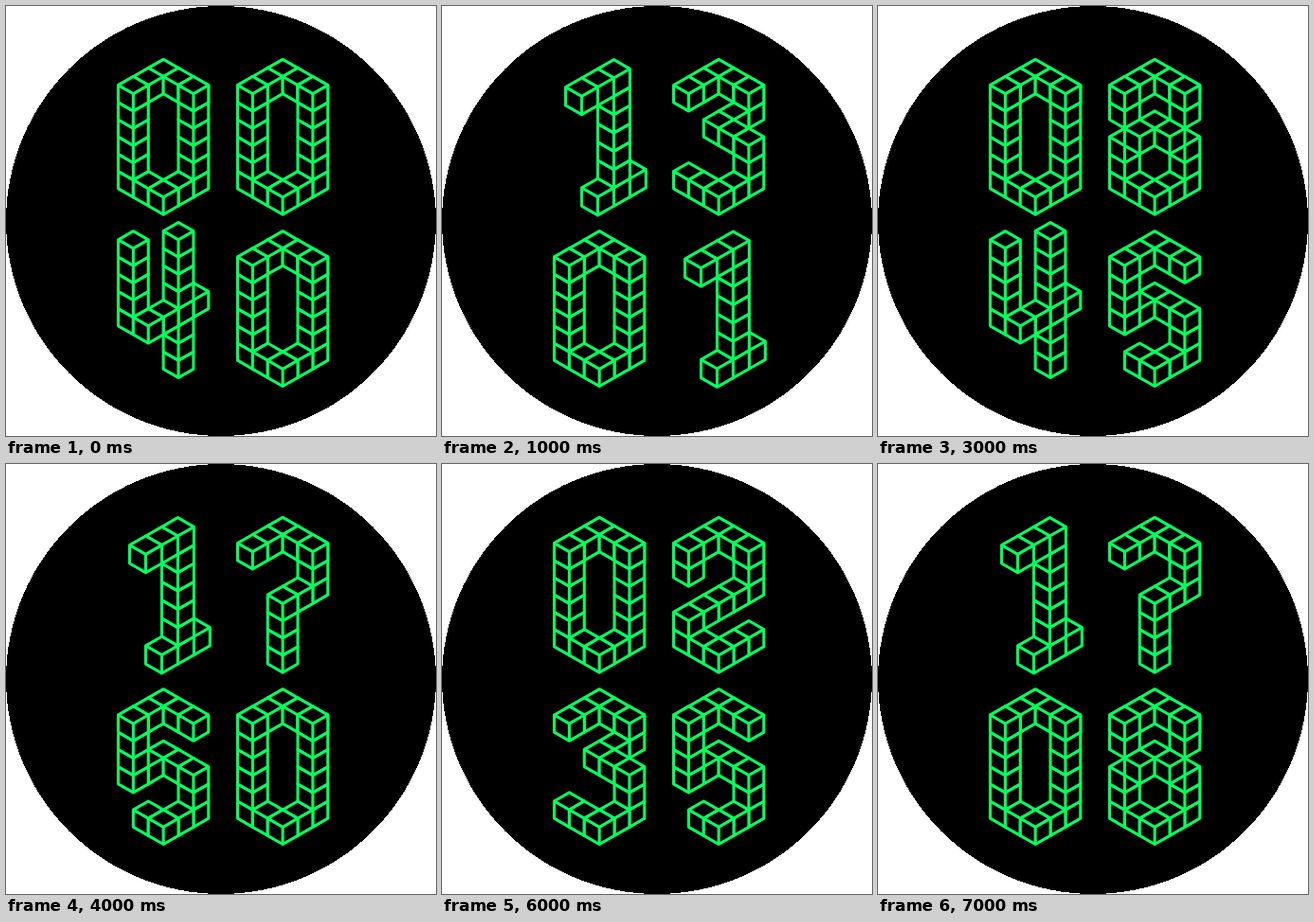
An HTML page with a canvas that plays this animation: 454x454 px, repeating every 8000 ms.

```html
<!DOCTYPE html>
<html>
<head>
<meta charset="utf-8">
<style>
  html, body { margin: 0; height: 100%; overflow: hidden; background: #fff; }
  svg, canvas { position: absolute; left: 0; top: 0; }
</style>
</head>
<body>
<svg width="454" height="454"><circle cx="227" cy="227" r="227" shape-rendering="crispEdges"/></svg>
<canvas id="stage" width="454" height="454"></canvas>
<script>
const ctx = document.getElementById('stage').getContext('2d');
const TIMES = ['0040', '1301', '0112', '0845', '1750', '0008', '0235', '1708'];
const HOLD = 1000;
const WIDE = { x: 134.4, y: 92.7, w: 15.88, h: 9.1 };
const NARROW = { x: 147.5, y: 76, w: 16.96, h: 9.66 };
let grid;

// Isometric grid: a column is half a cube wide, two rows are one cube high.
function cube(col, row) {
  const { w, h } = grid;
  const x = grid.x + col * w, y = grid.y + row * h;
  const outline = new Path2D();
  for (const [dx, dy] of [[0, -2], [1, -1], [1, 1], [0, 2], [-1, 1], [-1, -1]]) {
    outline.lineTo(x + dx * w, y + dy * h);
  }
  outline.closePath();
  ctx.fill(outline);
  for (const [dx, dy] of [[-1, -1], [1, -1], [0, 2]]) {
    outline.moveTo(x, y);
    outline.lineTo(x + dx * w, y + dy * h);
  }
  ctx.stroke(outline);
}

// Stacks are painted upwards, beams from the back to the front.
function stack(col, top, count) {
  while (count--) cube(col, top + 2 * count);
}

function beam(col, row, step, count) {
  for (let i = 0; i < count; i++) cube(col + i * step, row + i);
}

const west = (col, row, count = 1) => beam(col, row, -1, count);
const east = (col, row, count = 1) => beam(col, row, 1, count);
const roof = () => { west(2, -2, 3); east(3, -1, 2); };
const floor = () => { east(0, 10, 2); west(4, 10, 3); };

const DIGITS = {
  0() { roof(); floor(); stack(0, 0, 5); stack(4, 0, 5); },
  1() { west(3, 11); stack(2, 0, 7); west(1, 1, 2); west(1, 13); },
  2() { roof(); floor(); stack(0, 0, 2); stack(4, 0, 3); west(3, 5, 3); west(0, 8); },
  3() { roof(); floor(); stack(4, 0, 2); west(3, 3, 2); east(3, 5); stack(4, 6, 2); },
  4() { west(4, 4); stack(3, -3, 8); stack(0, -2, 5); west(2, 6, 2); },
  5() { roof(); east(1, 11); west(4, 10, 3); west(2, 4, 2); east(3, 5); stack(0, 0, 4); stack(4, 6, 2); },
  7() { roof(); stack(4, 0, 3); west(3, 5); stack(2, 6, 4); },
  8() {
    roof(); floor();
    for (const col of [0, 4]) { stack(col, 0, 2); stack(col, 6, 2); }
    west(2, 4, 2); east(3, 5);
  },
};

function draw(time) {
  ctx.clearRect(0, 0, 454, 454);
  ctx.fillStyle = '#000';
  ctx.strokeStyle = '#06ff60';
  ctx.lineWidth = 3.1;
  ctx.lineJoin = ctx.lineCap = 'round';
  [...time].forEach((digit, i) => {
    const base = digit === '1' ? NARROW : WIDE;
    grid = { ...base, x: base.x + i % 2 * 126, y: base.y + (i > 1 ? 181.4 : 0) };
    DIGITS[digit]();
  });
}

function tick() {
  draw(TIMES[Math.floor(performance.now() / HOLD) % TIMES.length]);
  requestAnimationFrame(tick);
}
tick();
</script>
</body>
</html>
```
